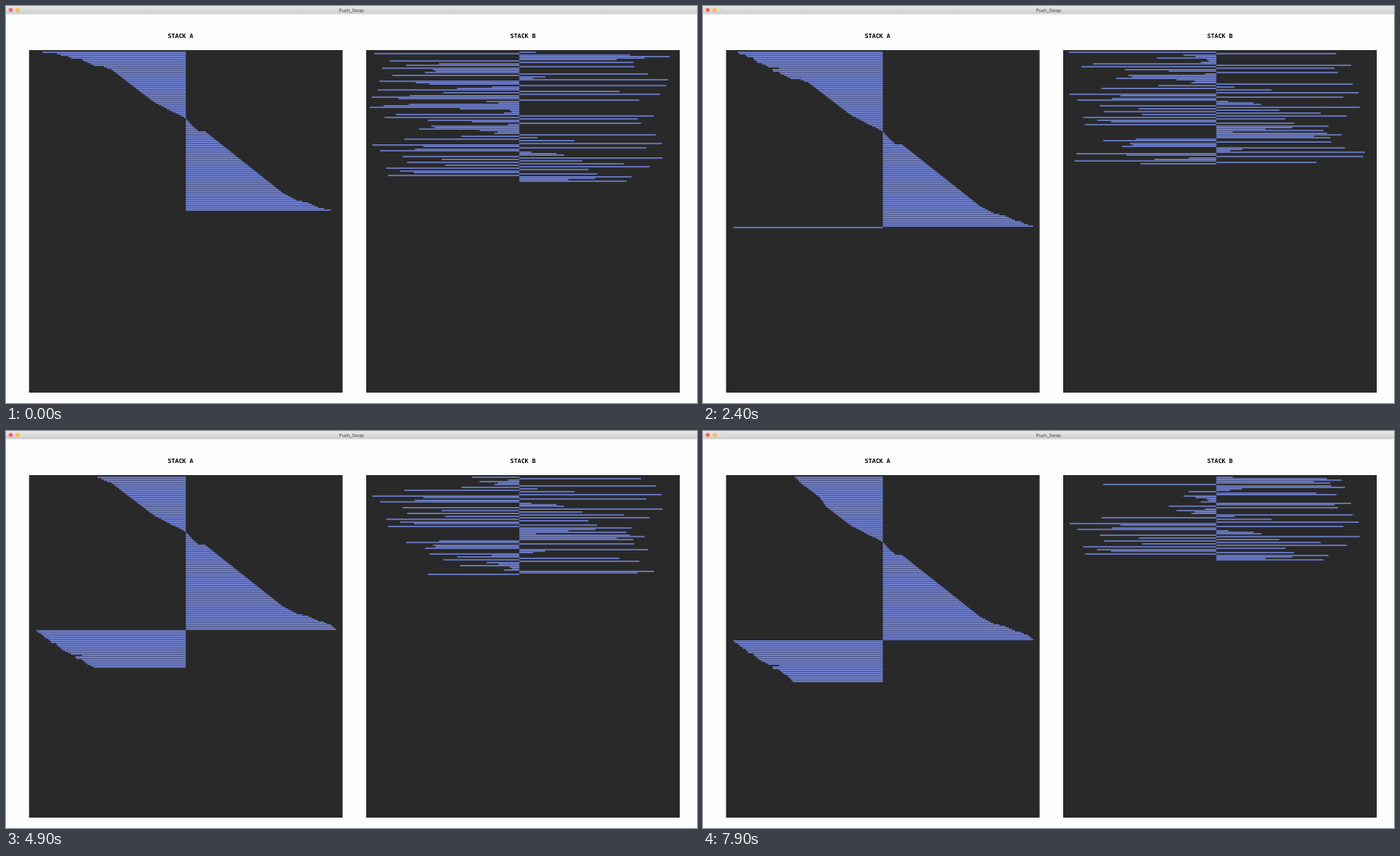
An HTML page with a canvas for the animation above (8 s loop, 800 px wide and 459 px high).

```html
<!DOCTYPE html>
<html lang="en">
<head>
<meta charset="utf-8">
<title>Push_Swap</title>
<style>
  html, body { margin: 0; width: 100%; height: 100%; overflow: hidden; background: #fdfdfd; }
  canvas { display: block; }
</style>
</head>
<body>
<canvas id="stage" width="800" height="459"></canvas>
<script>
const ctx = document.getElementById('stage').getContext('2d');
const LOOP = 8000, STEP = 100, PITCH = 1.675;

// Sorted values of stack A as a polyline of [row, value].
const curve = [[0, -166], [1, -149], [2, -145], [3, -136], [4, -133], [5, -120], [6, -118],
  [7, -114], [9, -107], [10, -95], [11, -91], [12, -86], [33, -40], [35, -35], [38, -25],
  [41, -16], [43, -8], [46, 0.5], [51, 8], [54, 14], [55, 23], [97, 112], [102, 128],
  [104, 142], [107, 153], [108, 160], [109, 168]];

function curveAt(row) {
  const k = Math.max(1, curve.findIndex(p => p[0] >= row));
  const [r0, v0] = curve[k - 1], [r1, v1] = curve[k];
  return v0 + (v1 - v0) * (row - r0) / (r1 - r0);
}

const a = Array.from({ length: 110 }, (_, row) => curveAt(row));
const b = [
  19, -168, 128, 174, 145, 113, -150, 132, -93, -131, 133, -159, -100, -97, -109,
  149, -147, 30, 16, 172, -162, -120, -104, 170, -32, -72, -164, 116, -88, 163,
  -127, -171, -140, 139, -38, -24, -128, -157, -173, -69, -11, -9, -18, -143, 156,
  -156, 137, -106, -55, 141, -13, -102, -98, -116, -46, -25, -29, 158, -67, 21,
  -133, 64, 0.5, 165, -170, -111, 147, -121, -161, 14, 43, 52, -135, 166, -90,
  73, -130, 121, -86, 151, -154, 80, -138, -122, 90, -152, 130, 88, 57, 124];

// Each stage: end time, values pushed to A, then where A and B have turned to.
const plan = [
  { end: 1400, push: [-168, 174, -150, -159, -147, -120, -127, -140], turn: [-137, -38] },
  { end: 2400, push: [-128, -157, -173, 163], turn: [-171, -171] },
  { end: 4000, push: [-171, -164, 170, 172, -162, -143, -156], turn: [-149.5, -55] },
  { end: 4900, push: [-102, -98, -116], turn: [-106, -55] },
  { end: 6300, push: [-106, -67, -69], turn: [-72, -72] },
  { end: 7900, push: [-72, -88, -104, -109, -97, -100, -93], turn: [-103, 19] }
];

const states = [];
const save = () => states.push([a.slice(), b.slice()]);

function rotate(stack, dir) {
  if (dir > 0) stack.push(stack.shift());
  else stack.unshift(stack.pop());
}

// Row of the smallest value above v, or of the minimum if there is none.
function slotFor(v) {
  const above = a.filter(x => x > v);
  return a.indexOf(Math.min(...(above.length ? above : a)));
}

// Cheapest rotations that bring A's slot for va and B's vb to the top.
function turnTo(va, vb) {
  const i = slotFor(va), j = b.indexOf(vb);
  const ra = i - a.length, rb = j - b.length;
  const cost = ([x, y]) =>
    x * y > 0 ? Math.max(Math.abs(x), Math.abs(y)) : Math.abs(x) + Math.abs(y);
  let [x, y] = [[i, j], [ra, rb], [i, rb], [ra, j]]
    .reduce((best, way) => cost(way) < cost(best) ? way : best);
  while (x || y) {
    const shared = x * y > 0, dx = Math.sign(x), dy = Math.sign(y);
    if (x) { rotate(a, dx); x -= dx; }
    if (y && (shared || !dx)) { rotate(b, dy); y -= dy; }
    save();
  }
}

save();
const keys = [[0, 0]];
for (const { end, push, turn } of plan) {
  for (const v of push) {
    turnTo(v, v);
    a.unshift(b.shift());
    save();
  }
  turnTo(...turn);
  keys.push([end, states.length - 1]);
}

function stateAt(t) {
  const k = Math.max(1, keys.findIndex(p => p[0] >= t));
  const [t0, n0] = keys[k - 1], [t1, n1] = keys[k];
  return states[Math.round(n0 + (n1 - n0) * (t - t0) / (t1 - t0))];
}

function text(str, x, y, font) {
  ctx.font = font;
  ctx.fillText(str, x, y);
}

function drawWindow() {
  ctx.fillStyle = '#fdfdfd';
  ctx.fillRect(0, 0, 800, 459);
  const bar = ctx.createLinearGradient(0, 0, 0, 9.5);
  bar.addColorStop(0, '#e9e9e9');
  bar.addColorStop(1, '#cdcdcd');
  ctx.fillStyle = bar;
  ctx.fillRect(0, 0, 800, 9.5);
  [['#fc5b57', 5.5], ['#fdbc40', 13.5], ['#d8d8d8', 22]].forEach(([color, x]) => {
    ctx.fillStyle = color;
    ctx.beginPath();
    ctx.arc(x, 4.6, 2.4, 0, 7);
    ctx.fill();
  });
  ctx.textAlign = 'center';
  ctx.fillStyle = '#444';
  text('Push_Swap', 400, 6.6, '5.3px Inter, "Liberation Sans", sans-serif');
  ctx.fillStyle = '#000';
  const bold = 'bold 7px "DejaVu Sans Mono", monospace';
  text('STACK A', 202, 37.3, bold);
  text('STACK B', 598.5, 37.3, bold);
}

function drawStack(stack, left, axis) {
  ctx.fillStyle = '#292929';
  ctx.fillRect(left, 51, 363, 396);
  ctx.fillStyle = '#7486dc';
  stack.forEach((v, row) =>
    ctx.fillRect(Math.min(axis, axis + v), 52.8 + row * PITCH, Math.abs(v), 1.35));
}

function frame(now) {
  const t = Math.floor(now % LOOP / STEP) * STEP;
  const [sa, sb] = stateAt(t);
  drawWindow();
  drawStack(sa, 26.7, 208.2);
  drawStack(sb, 417, 594.3);
  requestAnimationFrame(frame);
}
frame(0);
</script>
</body>
</html>
```
